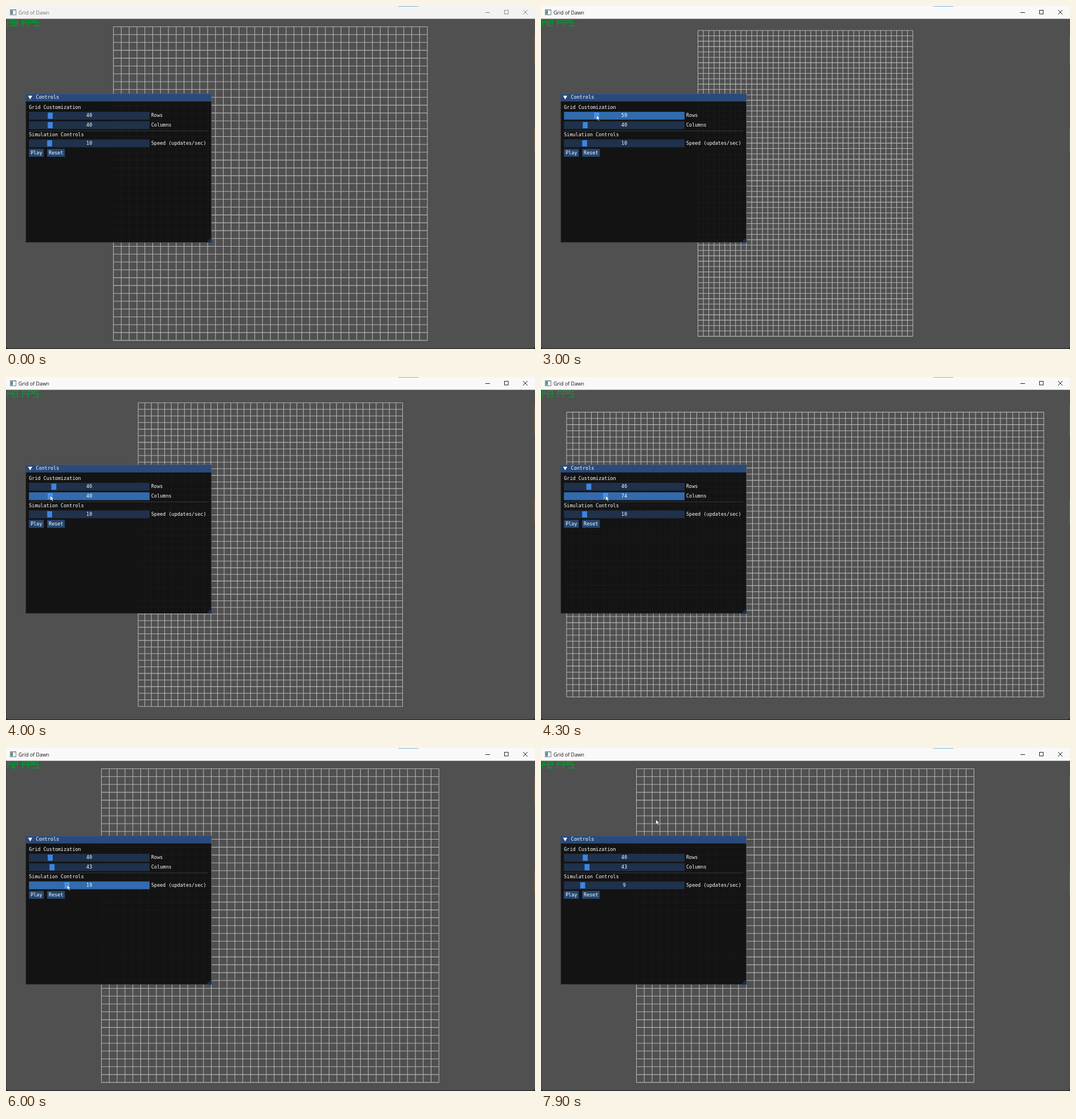
An HTML page with a canvas that plays this animation: 929 px wide and 603 px high, repeating every 8 s.

```html
<!DOCTYPE html>
<html>
<head>
<meta charset="utf-8">
<style>
html, body { margin: 0; width: 100%; height: 100%; overflow: hidden; background: #505050; }
canvas { display: block; }
</style>
</head>
<body>
<canvas id="stage" width="929" height="603"></canvas>
<script>
const g = document.getElementById('stage').getContext('2d');

// Everything below the title bar is laid out in a 1280 x 800 client area.
const SCALE = 0.7255, TOP = 22, WIDTH = 1280, HEIGHT = 800;
const PANEL = { x: 47.5, y: 182, w: 450, h: 361 };
const LEFT = PANEL.x + 8, TRACK = 292, BAR = 19;

// A slider is held while two neighbouring [time, value] keys differ.
const rows = { name: 'Rows', y: PANEL.y + 44, min: 10, max: 200,
  keys: [[2930, 40], [2950, 57], [3250, 67], [3500, 63], [3800, 46], [5350, 46], [5500, 40]] };
const cols = { name: 'Columns', y: PANEL.y + 67, min: 10, max: 200,
  keys: [[4000, 40], [4250, 77], [4300, 74], [4700, 51], [4900, 43]] };
const speed = { name: 'Speed (updates/sec)', y: PANEL.y + 111, min: 1, max: 60,
  keys: [[5750, 10], [6250, 28], [6900, 9]] };
const sliders = [rows, cols, speed];

const grabX = (s, v) => LEFT + 8 + (v - s.min) / (s.max - s.min) * (TRACK - 16);

// The pointer wanders freely, and follows the grabs while dragging.
const path = [[800, 452, 480], [1600, 227, 390], [1900, 117, 353], [2900, 121, 338],
  [7400, 283, 60], [7600, 283, 54], [7900, 278, 143]];
for (const s of sliders)
  path.push(...s.keys.map(([t, v]) => [t, grabX(s, v), s.y + 8]));
path.sort((a, b) => a[0] - b[0]);

function at(keys, t) {
  const i = keys.findIndex(k => k[0] > t);
  if (i <= 0) return keys.at(i).slice(1);
  const a = keys[i - 1], b = keys[i], k = (t - a[0]) / (b[0] - a[0]);
  return a.slice(1).map((v, j) => v + (b[j + 1] - v) * k);
}

const valueOf = (s, t) => Math.round(at(s.keys, t)[0]);

function isHeld(s, t) {
  const i = s.keys.findIndex(k => k[0] > t);
  return i > 0 && s.keys[i - 1][1] !== s.keys[i][1];
}

function box(x, y, w, h, color) {
  g.fillStyle = color;
  g.fillRect(x, y, w, h);
}

function trace(points) {
  g.beginPath();
  for (let i = 0; i < points.length; i += 2) g.lineTo(points[i], points[i + 1]);
}

function line(points, color, width = 1) {
  trace(points);
  g.strokeStyle = color;
  g.lineWidth = width;
  g.stroke();
}

function shape(points, color) {
  trace(points);
  g.closePath();
  g.fillStyle = color;
  g.fill();
}

function label(text, x, y, align = 'left') {
  g.font = '11.63px "DejaVu Sans Mono", monospace';
  g.textAlign = align;
  g.fillStyle = '#fff';
  g.fillText(text, x, y + 10);
}

function drawGrid(r, c) {
  const cell = Math.floor(Math.min(HEIGHT * 0.95 / r, WIDTH * 0.95 / c));
  const w = c * cell, h = r * cell;
  const x = Math.floor((WIDTH - w) / 2), y = Math.floor((HEIGHT - h) / 2);
  g.beginPath();
  for (let i = 0; i <= c; i++) g.rect(x + i * cell - 0.75, y, 1.5, h);
  for (let i = 0; i <= r; i++) g.rect(x, y + i * cell - 0.75, w, 1.5);
  g.fillStyle = '#b4b4b4';
  g.fill();
}

// Blocky counter characters built from the lit segments of a seven-bar cell.
const lit = { 1: 'bc', 2: 'abged', 3: 'abgcd', 4: 'fgbc', 8: 'abcdefg', F: 'afge', P: 'abfge', S: 'afgcd', ' ': '' };

function drawCounter(text) {
  let x = 2;
  g.lineCap = 'square';
  for (const ch of text) {
    const w = ch === '1' ? 2 : ch > '9' ? 10 : ch === ' ' ? 4 : 8;
    const r = x + w, y = 4, m = 10, b = 18;
    const bars = { a: [x, y, r, y], b: [r, y, r, m], c: [r, m, r, b], d: [x, b, r, b],
      e: [x, m, x, b], f: [x, y, x, m], g: [x, m, r, m] };
    for (const s of lit[ch]) line(bars[s], '#009e2f', 2);
    x = r + 4;
  }
  g.lineCap = 'butt';
}

function drawSlider(s, t, [mx, my]) {
  const value = valueOf(s, t), held = isHeld(s, t);
  const hover = mx >= LEFT && mx <= LEFT + TRACK && my >= s.y && my <= s.y + BAR;
  box(LEFT, s.y, TRACK, BAR, held ? '#326bae' : hover ? '#264871' : '#1f314b');
  box(grabX(s, value) - 6, s.y + 2, 12, BAR - 4, held ? '#4296fa' : '#3d85e0');
  label(value, LEFT + TRACK / 2, s.y + 3, 'center');
  label(s.name, LEFT + TRACK + 4, s.y + 3);
}

function drawButton(text, x) {
  const y = PANEL.y + 134;
  box(x, y, text.length * 7 + 8, BAR, '#264871');
  label(text, x + 4, y + 3);
}

function drawPanel(t, mouse) {
  const { x, y, w, h } = PANEL;
  box(x, y, w, h, 'rgba(15,15,15,.94)');
  box(x, y, w, BAR, '#294a7a');
  g.strokeStyle = 'rgba(110,110,128,.5)';
  g.lineWidth = 1;
  g.strokeRect(x + 0.5, y + 0.5, w - 1, h - 1);
  shape([x + 6, y + 5, x + 16, y + 5, x + 11, y + 14], '#fff');
  label('Controls', x + 25, y + 3);
  label('Grid Customization', LEFT, y + 27);
  box(LEFT, y + 90, w - 16, 1, '#46464c');
  label('Simulation Controls', LEFT, y + 94);
  for (const s of sliders) drawSlider(s, t, mouse);
  drawButton('Play', LEFT);
  drawButton('Reset', LEFT + 44);
  shape([x + w, y + h - 13, x + w, y + h, x + w - 13, y + h], '#1b304d');
}

function drawPointer([x, y]) {
  const arrow = [0, 0, 0, 12, 3, 9.6, 5, 14, 7, 13, 5, 9, 8.6, 8.6, 0, 0];
  g.save();
  g.translate(x, y);
  shape(arrow, '#fff');
  line(arrow, '#222', 0.8);
  g.restore();
}

function drawWindow(t) {
  box(0, 0, 929, 22.5, t < 200 ? '#f3f3f3' : '#f9f9f9');
  box(689, 0, 35, 0.6, '#2f7fc0');
  box(7, 6, 11, 10, '#777');
  box(8, 7.5, 9, 7.5, '#fff');
  box(8.5, 8, 3.5, 6.5, '#3f8f80');
  g.font = '8.8px "Open Sans", "Noto Sans", sans-serif';
  g.textAlign = 'left';
  g.fillStyle = t < 200 ? '#777' : '#111';
  g.fillText('Grid of Dawn', 22, 14.5);
  const ink = t < 3000 ? '#888' : '#222';
  line([842, 11.5, 850, 11.5], ink);
  g.strokeRect(875.5, 7.5, 6.5, 6.5);
  line([908, 7, 916, 15], ink);
  line([916, 7, 908, 15], ink);
  box(0, 22.5, 0.6, 581, '#333');
  box(928.6, 50, 0.4, 53, '#c08432');
  box(928.6, 215, 0.4, 42, '#c08432');
  box(0, 602, 929, 1, '#222');
  shape([0, 599, 0, 603, 4, 603], '#222');
  shape([929, 599, 929, 603, 925, 603], '#222');
}

function draw(now) {
  const t = Math.floor(now % 8000 / 100) * 100;
  const mouse = t < 800 ? [-50, -50] : at(path, t);
  const rate = t < 500 ? 138 : 141 + (2 * Math.floor(t / 500) + 1) % 3;
  box(0, 0, 929, 603, '#505050');
  g.save();
  g.translate(0, TOP);
  g.scale(SCALE, SCALE);
  // The grid trails the sliders slightly.
  drawGrid(valueOf(rows, t - 50), valueOf(cols, t - 50));
  drawCounter(rate + ' FPS');
  drawPanel(t, mouse);
  drawPointer(mouse);
  g.restore();
  drawWindow(t);
}

const start = performance.now();
(function loop() {
  draw(performance.now() - start);
  requestAnimationFrame(loop);
})();
</script>
</body>
</html>
```
